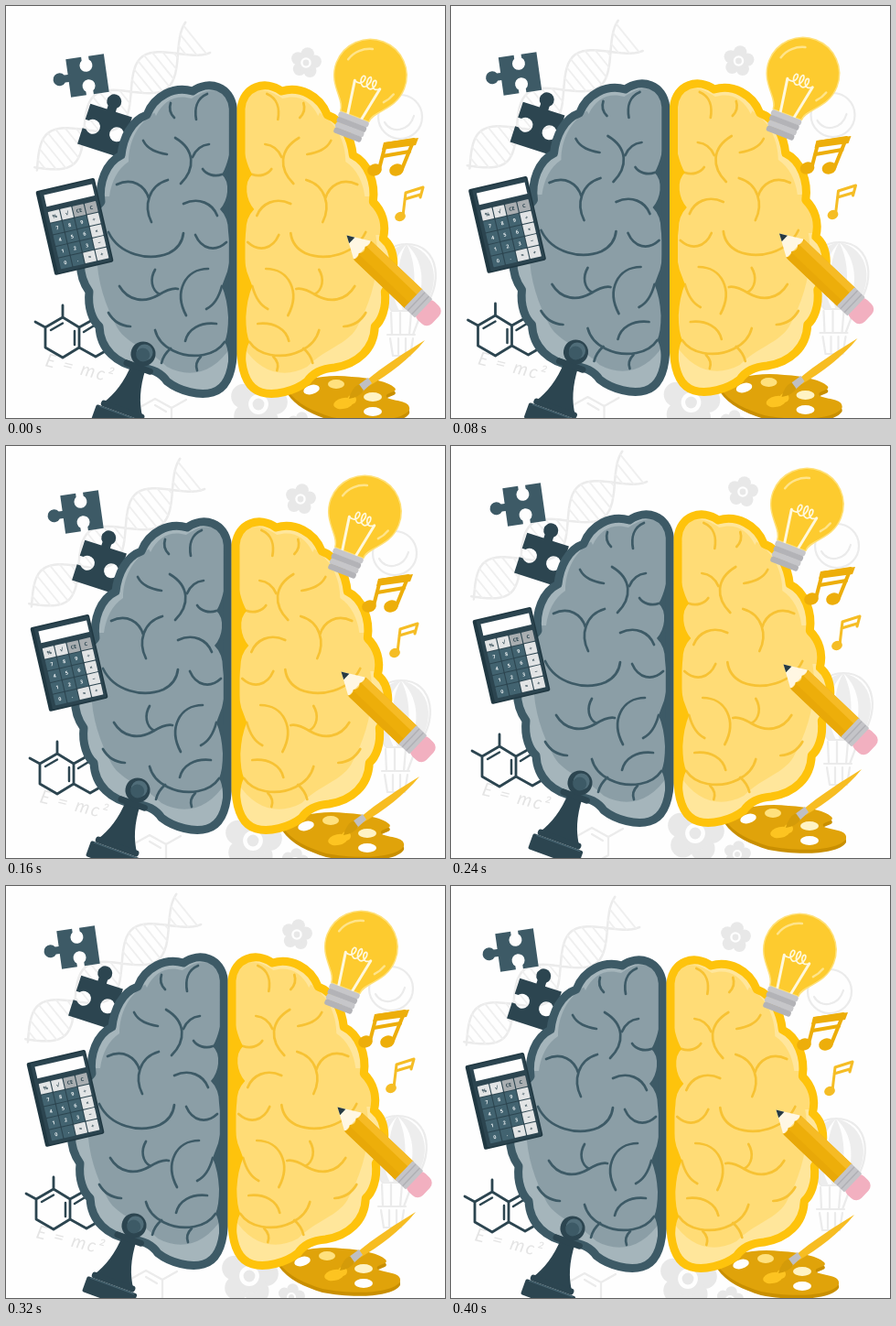
Animation, 480 px wide and 450 px high, one loop 480 ms. Source, as an HTML page:

```html
<!DOCTYPE html>
<html lang="en">
<head>
<meta charset="utf-8">
<title>Two halves of the mind</title>
<style>
html, body { margin: 0; width: 100%; height: 100%; overflow: hidden; background: #fefefe; }
svg { display: block; width: 480px; height: 450px; }
.line { fill: none; stroke-linecap: round; stroke-linejoin: round; }
.faint { fill: none; stroke: #ebebeb; stroke-width: 2.2; stroke-linecap: round; stroke-linejoin: round; }
.key { font: 700 5.5px "Open Sans", sans-serif; text-anchor: middle; }
</style>
</head>
<body>
<svg viewBox="0 0 480 450">
<defs>
  <path id="half" d="M248.3 112 C246 88 222 80 204 93 C184 87 162 98 154 119 C137 125 128 144 126 163 C109 171 101 194 104 214 C94 224 89 238 93 254 C78 266 78 294 91 312 C89 330 95 344 102 350 C103 375 121 391 146 395 C160 396 170 401 176 410 C190 421 212 426 226 422 C240 418 247 402 248.3 380 Z"/>
  <clipPath id="inside"><use href="#half"/></clipPath>
  <g id="shine" clip-path="url(#inside)">
    <path d="M75 250 H101 C95 288 106 322 122 352 C133 370 156 374 176 394 C202 408 228 400 246 372 V435 H90Z"/>
    <path d="M106 176 C122 150 130 130 152 106 L163 116 C144 128 134 148 134 170 C122 178 115 192 113 208 H100Z"/>
    <path d="M160 112 C170 92 190 86 206 94 C216 82 235 84 246 96 L238 95 C222 88 211 96 203 101 C186 96 172 103 164 120Z"/>
  </g>
  <path id="wedges" d="M249 130 Q245 170 236 184 Q243 190 242 203 Q241 214 234 222 Q243 231 243 246 Q247 272 242 290 L236 306 Q242 320 243 340 Q243 358 239 367 Q244 374 243 395 L250 395 Z"/>
  <g id="folds" class="line">
    <path d="M220 96 C208 101 206 113 208 124 M180 106 C178 112 180 118 184 122"/>
    <path d="M185 144 C207 157 207 178 191 194 M222 151 C213 152 207 158 204 165 M150 147 C155 157 165 160 176 162"/>
    <path d="M236 184 C228 187 219 184 215 178"/>
    <path d="M121 195 C138 187 152 196 156 210 M177 190 C156 196 150 218 159 236"/>
    <path d="M194 216 C211 208 226 216 231 229"/>
    <path d="M112 247 C124 272 156 279 178 270 C188 265 193 257 194 248"/>
    <path d="M207 250 C214 266 229 269 241 258"/>
    <path d="M163 288 C157 298 159 310 168 315 M124 306 C134 323 152 324 166 316 C176 310 184 308 188 309"/>
    <path d="M221 287 C196 287 183 312 197 338 M236 306 Q231 325 219 331"/>
    <path d="M163 354 C168 374 193 385 216 381 C227 379 235 373 239 367 M196 366 C199 353 212 345 230 347"/>
    <path d="M180 374 Q172 381 170 390 M213 383 Q206 390 209 398 M112 335 Q120 349 136 350"/>
  </g>
</defs>
<g id="scene"></g>
</svg>
<script>
const scene = document.getElementById("scene");
const INK = "#2c4550", TEAL = "#3d5a66", GOLD = "#edae0a", AMBER = "#f5bd25";
const FAINT = "#ebebeb", PAPER = "#fefefe";

const line = (d, color, width) =>
  `<path class="line" d="${d}" stroke="${color}" stroke-width="${width}"/>`;
const fill = (d, color) => `<path d="${d}" fill="${color}"/>`;
const faint = d => `<path class="faint" d="${d}"/>`;
const dot = (x, y, rx, color, ry = rx, turn = 0) =>
  `<ellipse cx="${x}" cy="${y}" rx="${rx}" ry="${ry}" fill="${color}" transform="rotate(${turn} ${x} ${y})"/>`;
const box = (x, y, w, h, color, r = 0) =>
  `<rect x="${x}" y="${y}" width="${w}" height="${h}" rx="${r}" fill="${color}"/>`;
const place = (x, y, turn, body) =>
  `<g transform="translate(${x} ${y}) rotate(${turn})">${body}</g>`;

function flower(x, y, r) {
  let out = "";
  for (let i = 0; i < 5; i++) {
    const a = (i * 72 - 80) * Math.PI / 180;
    out += dot(x + Math.cos(a) * r * .58, y + Math.sin(a) * r * .58, r * .42, "#e8e8e8");
  }
  return out + dot(x, y, r * .58, "#e8e8e8") + dot(x, y, r * .34, PAPER) + dot(x, y, r * .2, "#e8e8e8");
}

function helix() {
  const wave = t => 22 * Math.sin(Math.PI * t / 66);
  const strand = sign => {
    let d = "";
    for (let t = -200; t <= 28; t += 4) d += `${d ? "L" : "M"}${t} ${(sign * wave(t)).toFixed(1)}`;
    return d;
  };
  let rungs = "";
  for (let t = -192; t < 28; t += 9) rungs += `M${t} ${wave(t).toFixed(1)}V${(-wave(t)).toFixed(1)}`;
  return place(188, 52, -39, line(strand(1) + strand(-1), FAINT, 2.5) + line(rungs, "#efefef", 1.8));
}

function balloon() {
  return place(-3, 1, 0, faint("M425 332 C404 306 405 259 441 259 C478 259 482 306 457 332 Z") +
    `<g fill="#ededed"><path d="M426 332C401 300 412 264 441 259C423 278 420 305 433 332Z"/>
    <path d="M437 332C428 302 431 276 441 259C451 278 452 304 445 332Z"/>
    <path d="M450 332C462 304 460 277 441 259C474 266 481 304 456 332Z"/></g>` +
    faint("M424 334 L425 358 M434 334 V358 M446 334 L444 358 M457 334 L448 358 M420 358 H450 M423 362 L426 381 H445 L448 362 M432 362 V379 M440 362 V379"));
}

function backdrop() {
  return helix() + flower(328, 62, 17) + flower(276, 435, 32) + flower(322, 458, 15) + balloon() +
    `<circle class="faint" cx="431" cy="121" r="24"/>` +
    faint("M414 127 C421 140 441 137 446 120") +
    faint("M163 429 L181 439 V459 L163 469 L145 459 V439 Z M181 439 L197 430 M163 436 L175 443") +
    place(42, 393, 14, `<text fill="#e4e4e4" style="font:italic 20px Lato,sans-serif;letter-spacing:2px">E = mc²</text>`);
}

function puzzles() {
  const small = "M-21 -21h17v4a7 7 0 1 0 8 0v-4h17v42h-17v-4a7 7 0 1 0 -8 0v4h-17v-17h-4a7 7 0 1 1 0 -8h4z";
  const large = "M-24 -23h19v-4a8 8 0 1 1 10 0v4h19v18h-4a8 8 0 1 0 0 10h4v18h-48v-18h4a8 8 0 1 0 0 -10h-4z";
  return place(89, 76, -8, fill(small, TEAL)) + place(108, 136, 18, fill(large, INK));
}

function molecule() {
  return line("M62 327 V340 L80 351 V373 L62 384 L43 373 V351 L62 340 M32 345 L43 351 M80 351 L98 341 L116 351 M80 373 L98 383 L112 375", INK, 2.8) +
    line("M49 354 L62 346.5 M75 355 V370 M85 356 L98 348", INK, 2.5);
}

function calculator() {
  const rows = [["%", "√", "CE", "C"], ["7", "8", "9", "÷"], ["4", "5", "6", "×"], ["1", "2", "3", "−"], ["0", ".", "=", "+"]];
  let out = box(0, 0, 66, 94, "#203842", 2) + box(4, 1.5, 60.5, 91, INK, 1.5) + box(8, 6, 54, 13, PAPER);
  rows.forEach((row, r) => row.forEach((label, c) => {
    const light = c === 3 || r === 0 || (r === 4 && c === 2);
    const color = r === 0 && c > 1 ? "#a9aeb1" : light ? "#e2e4e5" : "#426370";
    const x = 8 + c * 13.7, y = 25 + r * 13;
    out += box(x, y, 12.6, 12, color, .6) +
      `<text class="key" x="${x + 6.3}" y="${y + 8}" fill="${light ? INK : "#e8eef0"}">${label}</text>`;
  }));
  return place(32.3, 202.5, -13, out);
}

function half(edge, body, light, fold, flip) {
  return `<g ${flip ? 'transform="translate(505.3) scale(-1 1)"' : ""}>
    <use href="#half" fill="${body}"/>
    <use href="#shine" fill="${light}"/>
    <use href="#folds" stroke="${fold}" stroke-width="2.7"/>
    <use href="#wedges" fill="${edge}"/>
    <use href="#half" fill="none" stroke="${edge}" stroke-width="9" stroke-linejoin="round"/></g>`;
}

function pawn() {
  return place(150, 380, 20,
    fill("M-8 14 H8 C9 36 14 52 23 65 H-23 C-14 52 -9 36 -8 14Z", INK) +
    box(-17, 12, 34, 7, INK, 3.5) + box(-25, 62, 50, 7, INK, 3) +
    box(-29, 69, 58, 18, INK, 2) + line("M-25 70 H25", "#476572", 1.2) +
    dot(0, 0, 13.5, INK) + dot(1, -2, 9, "#506d79") + dot(0, 1, 7.5, TEAL));
}

function bulb() {
  const glass = "M-16 46 C-16 33 -39 24 -39 -1 A39 39 0 0 1 39 -1 C39 24 16 33 16 46 Z";
  let cap = "";
  for (let i = 0; i < 4; i++) cap += box(-17.5 + i * .5, 47 + i * 6, 35 - i, 6.4, i % 2 ? "#b3b3b7" : "#c6c6c9", 2.5);
  return place(398, 77, 21,
    line(glass, "#ffe078", 3) + fill(glass, "#fdcb2f") +
    line("M-29 -9 A30 30 0 0 1 -8 -29 M31 9 A32 32 0 0 1 24 21", "#ffe48a", 2.5) +
    line("M-8 47 L-14 10 M8 47 L15 9", "#fff8dc", 3) +
    line("M-14 10 C-3 15 -2 -1 -7 2 C-11 7 -3 18 1 10 C5 1 0 -3 -1 4 C-1 15 8 16 9 6 C9 -1 4 2 6 8 Q9 14 15 9", "#fff8dc", 1.7) +
    cap);
}

function notes() {
  return line("M408 178 L415 151 L446 146 L433 178", GOLD, 4) +
    fill("M413 149 L451 144 L448 152 L411 157Z", GOLD) + line("M412 164 L441 159", GOLD, 4) +
    dot(403, 179, 8, GOLD, 6.5, -20) + dot(427, 179, 8, GOLD, 6.5, -20) +
    line("M434 229 L437 204 L456 198 L453 209 M436 211 L453 206", AMBER, 3) +
    dot(431, 230, 6, AMBER, 5, -20);
}

function palette() {
  const board = "M308 420 C324 406 352 402 378 405 C400 406 419 411 425 417 C430 423 411 422 417 428 C426 432 443 431 441 441 C432 455 386 455 356 449 C337 443 318 435 308 420Z";
  return place(0, 4, 0, fill(board, "#c98f00")) + fill(board, "#e0a30a") +
    dot(334, 419, 9, PAPER, 5, -15) + dot(361, 413, 9, "#ffe17e", 5) +
    dot(401, 427, 10, "#fff3c4", 5) + dot(401, 443, 10, PAPER, 5) +
    dot(369, 434, 11, "#fdc421", 6, -12) + dot(378, 430, 5, "#fdc421");
}

function brush() {
  return fill("M458 365 C440 376 411 394 393 410 L397 415 C419 402 441 386 458 365Z", "#f7bd22") +
    fill("M396 406 L385 414 L390 421 L400 412Z", "#bfbfc3") +
    fill("M386 413 Q378 417 375 429 Q387 427 391 420Z", "#d49b09");
}

function pencil() {
  return place(372.5, 250.5, 43.5,
    fill("M0 0 L24 -14 V14Z", "#fff7e3") + fill("M0 0 L8 -4.5 V4.5Z", "#263a43") +
    fill("M23 -14 Q27 -9 23 -5 Q28 0 23 5 Q27 10 23 14 H102 V-14Z", GOLD) +
    box(25, -14, 76, 8, "#f6bb25") + box(25, 6, 76, 8, "#e8a808") +
    box(112, -13.5, 22, 27, "#f2b0c0", 8) + box(100, -14, 16, 28, "#c4c4c8", 1) +
    line("M105 -13 V13 M111 -13 V13", "#b0b0b5", 1.4));
}

scene.innerHTML = backdrop() + puzzles() + molecule() + palette() +
  half(TEAL, "#8b9ea6", "#a5b5bb", TEAL, false) +
  half("#fec30c", "#ffdc76", "#ffe69b", "#f7c233", true) +
  calculator() + pawn() + notes() + bulb() + pencil() + brush();

// The whole drawing jolts between fixed offsets.
const STEP = 80;
const shake = [[0, 0], [-13.5, -2], [-6, -4], [-9, -12], [-10, -9], [-17, -6]];

function draw(time) {
  const [x, y] = shake[Math.floor(time / STEP) % shake.length];
  scene.setAttribute("transform", `translate(${x} ${y})`);
}

let start;
function tick(now) {
  start ??= now;
  draw(Math.max(0, now - start));
  requestAnimationFrame(tick);
}
draw(0);
requestAnimationFrame(tick);
</script>
</body>
</html>
```
